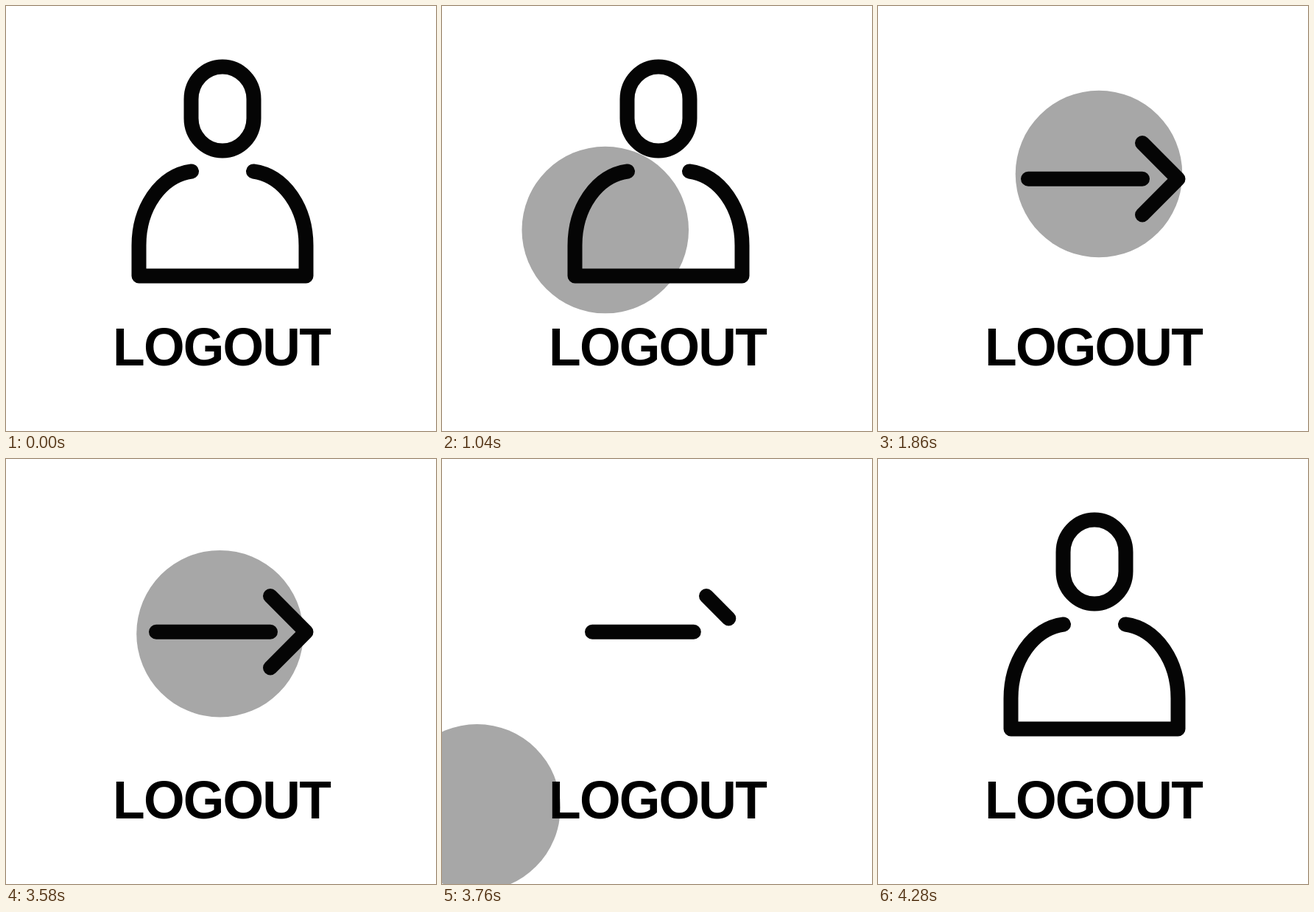
An HTML page for the animation above (5980 ms loop, 584 by 577 pixels).

```html
<!DOCTYPE html>
<html lang="en">
<head>
<meta charset="utf-8">
<title>Logout</title>
<style>
  html, body { margin: 0; width: 100%; height: 100%; overflow: hidden; background: #fff; }
  svg { display: block; width: 584px; height: 577px; }
  path { fill: none; stroke: #050505; stroke-width: 20; stroke-linecap: round; stroke-linejoin: round; }
  text { font: bold 71.5px "Liberation Sans", Arial, sans-serif; letter-spacing: -1.8px; }
</style>
</head>
<body>
<svg viewBox="0 0 584 577">
  <circle id="disc" r="113.3" fill="#a7a7a7"/>
  <path id="head" pathLength="1" d="M294 196.5A42.5 44 0 0 1 251.5 152.5V126.5A42.5 44 0 0 1 336.5 126.5V152.5A42.5 44 0 0 1 294 196.5"/>
  <path id="body" pathLength="1" d="M252 224.5C211 230 180.5 273 180.5 325V366.5H407.5V325C407.5 273 377 230 336 224.5"/>
  <path id="shaft" pathLength="1" d="M204 234.8H359"/>
  <path id="tip" pathLength="1" d="M359 186L407.5 234.8L359 283.5"/>
  <text x="145" y="488">LOGOUT</text>
</svg>
<script>
const LOOP = 5980;
const $ = id => document.getElementById(id);

// Each part: resting amount, then [start, duration, change] steps in ms.
const parts = {
  disc:  { rest: 0, steps: [[804, 450, 1], [3558.5, 628, -1]] },
  head:  { rest: 1, steps: [[1305, 400, -1], [4027, 260, 1]] },
  body:  { rest: 1, steps: [[1323, 400, -1], [4027, 260, 1]] },
  shaft: { rest: 0, steps: [[1480, 300, 1], [3728, 300, -1]] },
  tip:   { rest: 0, steps: [[1565, 300, 1], [3640, 300, -1]] }
};

// cubic-bezier(.25, .1, .25, 1), solved by bisection
function ease(x) {
  if (x <= 0) return 0;
  if (x >= 1) return 1;
  let lo = 0, hi = 1, s;
  for (let i = 0; i < 24; i++) {
    s = (lo + hi) / 2;
    if (s * (0.75 + s * (s - 0.75)) < x) lo = s; else hi = s;
  }
  return s * (0.3 + s * (2.4 - 1.7 * s));
}

function amount(part, t) {
  return part.steps.reduce(
    (sum, [start, span, change]) => sum + change * ease((t - start) / span),
    part.rest);
}

function draw(t) {
  for (const id in parts) {
    const el = $(id), p = amount(parts[id], t);
    if (id === "disc") {
      el.setAttribute("cx", 300 - 454 * (1 - p));
      el.setAttribute("cy", 228 + 441 * (1 - p));
    } else {
      el.style.visibility = p > 0.001 ? "visible" : "hidden";
      el.style.strokeDasharray = p > 0.999 ? "none" : `${p} 2`;
    }
  }
}

const begin = performance.now();
function tick() {
  draw((performance.now() - begin) % LOOP);
  requestAnimationFrame(tick);
}
draw(0);
requestAnimationFrame(tick);
</script>
</body>
</html>
```
